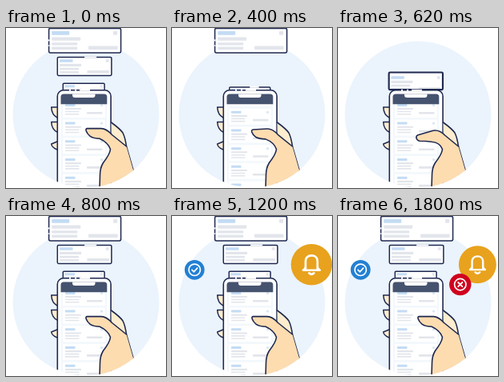
Animation, 200 px wide and 200 px high, one loop 2620 ms. Source, as an HTML page with a canvas:

```html
<!DOCTYPE html>
<html lang="en">
<head>
<meta charset="utf-8">
<title>Phone notifications</title>
<style>
  html, body { margin: 0; width: 100%; height: 100%; overflow: hidden; background: #fff; }
  canvas { display: block; width: 200px; height: 200px; }
</style>
</head>
<body>
<canvas id="stage"></canvas>
<script>
const LOOP = 2620;
const INK = '#1f2950', BLUE = '#c3dcf4', GREY = '#e2e5eb', SKIN = '#fddcb0', PALE = '#feedcf';
const canvas = document.getElementById('stage');
const ctx = canvas.getContext('2d');
const ratio = Math.max(1, window.devicePixelRatio || 1);
canvas.width = canvas.height = 200 * ratio;

const clamp = v => Math.min(1, Math.max(0, v));
const phase = (t, from, to) => clamp((t - from) / (to - from));
const smooth = p => p * p * (3 - 2 * p);
const lerp = (a, b, p) => a + (b - a) * p;
const pop = p => p <= 0 ? 0 : 1 + 2.7 * (p - 1) ** 3 + 1.7 * (p - 1) ** 2;

function fill(color, path) {
  ctx.fillStyle = color;
  ctx.fill(path);
}

function stroke(color, width, path) {
  ctx.strokeStyle = color;
  ctx.lineWidth = width;
  ctx.stroke(path);
}

function box(x, y, w, h, r = 0) {
  const p = new Path2D();
  p.roundRect(x, y, w, h, r);
  return p;
}

function disc(x, y, r) {
  const p = new Path2D();
  p.arc(x, y, r, 0, Math.PI * 2);
  return p;
}

function bar(color, x, y, w, h) {
  fill(color, box(x, y, w, h, Math.min(0.8, h / 3)));
}

function scoped(draw) {
  ctx.save();
  draw();
  ctx.restore();
}

// Floating cards shrink as they fall behind the phone.
const cards = [
  { cx: 97.2, y: 69.3, w: 51.8, start: 220, end: 290, reach: 125, gaps: [] },
  { cx: 98.1, y: 36.5, w: 67.6, start: 220, end: 413, reach: 132, gaps: ['M45 0H65'] },
  { cx: 98.6, y: 0.4, w: 90, start: 420, end: 660, reach: 190, gaps: ['M0 14V16', 'M0 21V22.3'] }
];

function drawCard(c, t) {
  const p = phase(t, c.start, c.end);
  const active = t < 800 ? p * p : 0;
  if (active === 1) return;
  const y = lerp(c.y, 79, active);
  const s = c.w * Math.exp((c.y - y) / c.reach) / 90;
  const slip = c.w === 90 ? 2.6 * clamp(active * 7) : 0;
  const cx = lerp(c.cx, 97.3, clamp(active * 5));
  scoped(() => {
    ctx.translate(cx - 45 * s, y);
    ctx.scale(s, s);
    const body = box(0, 0, 90, 30.5 - slip * 0.6, 1.8);
    fill('#fff', body);
    scoped(() => {
      ctx.clip(body);
      ctx.translate(0, slip);
      bar(BLUE, 3.6, 3.6, 22, 4.8);
      bar(GREY, 3.6, 11, 36, 4.4);
      bar(GREY, 3.6, 17.8, 32, 3.4);
      bar(GREY, 3.6, 23.2, 32, 3.4);
      bar(GREY, 80.5, 3.6, 5, 4.8);
      bar(GREY, 49.5, 22, 36.5, 4.6);
    });
    stroke(INK, (1.5 + slip * 0.25) / s, body);
    if (!slip) {
      ctx.lineCap = 'butt';
      c.gaps.forEach(d => stroke('#fff', 1.9 / s, new Path2D(d)));
    }
  });
}

function listItem(y) {
  fill('#fff', box(71, y - 4.5, 53, 20, 1));
  bar(BLUE, 74, y - 1.5, 12.5, 3);
  bar(GREY, 74, y + 3.6, 20, 2.1);
  bar(GREY, 74, y + 7.3, 17.5, 1.6);
  bar(GREY, 74, y + 10.6, 17.5, 1.6);
  bar('#d9e6f3', 118, y - 1.3, 3, 2.8);
  bar(GREY, 101, y + 8.6, 19.5, 2.6);
}

function drawPhone(t) {
  const shell = box(64.3, 77.8, 66.8, 140, 7.5);
  const screen = box(68.5, 82.6, 57.8, 135, 3.5);
  fill('#fff', shell);
  scoped(() => {
    ctx.clip(screen);
    fill('#f3f8fd', screen);
    const steps = [220, 380, 540].reduce((sum, s) => sum + smooth(phase(t, s, s + 80)), 0);
    const scroll = steps * 22.7 / 3;
    for (let i = -1; i < 5; i++) listItem(96.4 + i * 22.7 + scroll);
    fill('#46536f', box(68, 82, 59, 13.3));
    fill('#fff', box(83, 79, 28.5, 8, 3));
  });
  stroke(INK, 1.6, shell);
  ctx.lineCap = 'butt';
  stroke('#fff', 2, new Path2D('M79 77.8H81M86 77.8H88M92 77.8H105'));
  ctx.lineCap = 'round';
}

function drawFingers() {
  for (const [y, h] of [[99, 13], [117.5, 12.5], [142, 10]]) {
    const flat = h > 10 ? 0 : 3;
    const p = new Path2D(`M64 ${y}L56.7 ${y + flat}Q57.2 ${y + h * 0.75} 64 ${y + h}`);
    fill(PALE, p);
    stroke(INK, 1.5, p);
  }
}

function drawHand(t) {
  let k = 0;
  for (const s of [220, 380, 540]) {
    k += smooth(phase(t, s, s + 80)) - smooth(phase(t, s + 80, s + 155));
  }
  const m = (a, b) => lerp(a, b, k).toFixed(2);
  const edge = 'M131.5 118Q142.5 126 146 131Q149 137 150.5 148L160 181';
  fill(PALE, new Path2D(edge + 'L132 150Z'));
  stroke(INK, 1.6, new Path2D(edge));

  const top = `M150.5 148L${m(132.5, 133.5)} ${m(133.5, 134)}` +
    `Q${m(125.5, 127)} ${m(125.6, 127)} ${m(119, 119)} ${m(125.6, 128.2)}` +
    `L${m(101.5, 100)} ${m(125.6, 133.8)}`;
  const tip = `C${m(98.5, 96.5)} ${m(125.6, 135)} ${m(100, 97.5)} ${m(131, 140.5)} ${m(105, 102)} ${m(135.2, 141.2)}`;
  const base = `Q${m(109, 110)} ${m(138.2, 141.3)} ${m(117, 117)} ${m(138.2, 142.2)}` +
    'Q127.5 143 130.5 151.5Q130 157.5 121.5 168.5Q117.5 175 117.5 184L117 202';
  fill(SKIN, new Path2D(top + tip + base + 'H165L160 181Z'));
  stroke(INK, 1.6, new Path2D(top + tip + base));
}

function badge(x, y, r, color, scale, icon) {
  if (scale <= 0) return;
  scoped(() => {
    ctx.translate(x, y);
    ctx.scale(scale, scale);
    fill(color, disc(0, 0, r));
    icon();
  });
}

function drawBadges(t) {
  badge(28.2, 67.3, 12.4, '#2380d3', pop(phase(t, 920, 1160)), () => {
    stroke('#fff', 1.7, disc(0, 0, 7.2));
    stroke('#fff', 1.7, new Path2D('M-3.2 0L-.8 2.5L3.4 -2.2'));
  });
  badge(174.4, 60.8, 23.5, '#e8a21d', pop(phase(t, 1070, 1320)), () => {
    stroke('#fff', 2.4, new Path2D(
      'M-9.5 6.3H9.5M-6.8 6V-4C-6.8 -8 -4 -10.4 0 -10.4S6.8 -8 6.8 -4V6M-6.8 2Q-7 5 -9.5 6.3M6.8 2Q7 5 9.5 6.3'));
    stroke('#fff', 2.4, new Path2D('M-2.8 9.6Q0 12.3 2.8 9.6'));
  });
  badge(152.8, 85.6, 13.7, '#d0021f', pop(phase(t, 1430, 1565)), () => {
    stroke('#fff', 1.7, disc(0, 0, 7.2));
    stroke('#fff', 1.8, new Path2D('M-2.6 -2.6L2.6 2.6M2.6 -2.6L-2.6 2.6'));
  });
}

function drawSpark(t) {
  const p = phase(t, 1480, 1700);
  if (p <= 0 || p >= 1) return;
  const outer = lerp(2, 11, Math.sqrt(p) * 1.2);
  const inner = lerp(1, 13, p);
  if (inner >= outer) return;
  const rays = new Path2D();
  for (let i = 0; i < 8; i++) {
    const a = i * Math.PI / 4;
    rays.moveTo(155 + inner * Math.cos(a), 49.8 + inner * Math.sin(a));
    rays.lineTo(155 + outer * Math.cos(a), 49.8 + outer * Math.sin(a));
  }
  stroke(INK, 1.5, rays);
}

function render(t) {
  ctx.setTransform(canvas.width / 200, 0, 0, canvas.height / 200, 0, 0);
  ctx.lineCap = ctx.lineJoin = 'round';
  ctx.fillStyle = '#fff';
  ctx.fillRect(0, 0, 200, 200);
  const backdrop = disc(100, 108, 91.5);
  fill('#ebf4fc', backdrop);
  cards.forEach(c => drawCard(c, t));
  scoped(() => {
    ctx.clip(backdrop);
    drawFingers();
    drawPhone(t);
    drawHand(t);
  });
  drawBadges(t);
  drawSpark(t);
}

const began = performance.now();
function tick() {
  render((performance.now() - began) % LOOP);
  requestAnimationFrame(tick);
}
tick();
</script>
</body>
</html>
```
